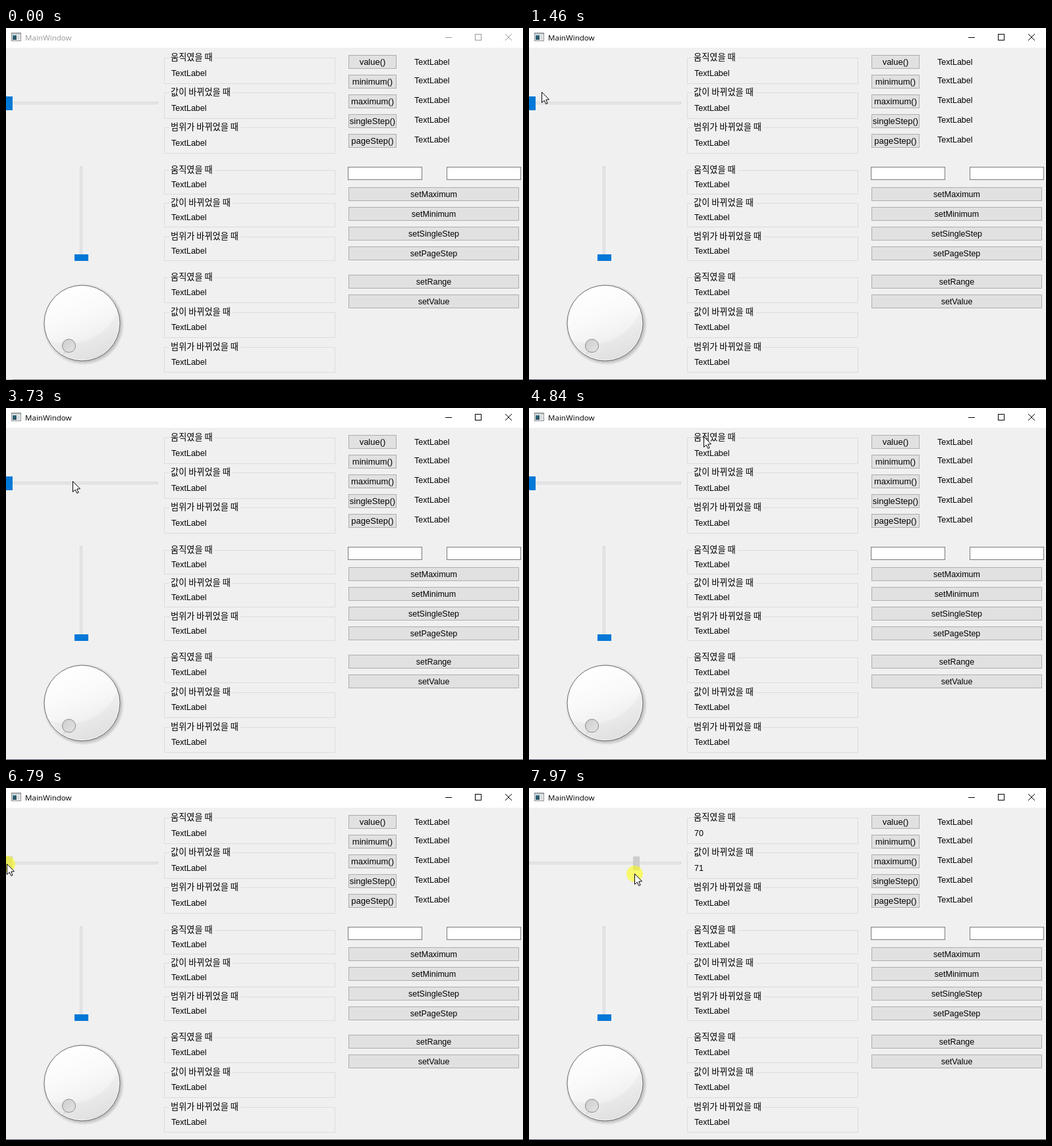
An HTML page with a canvas for the animation above (8 s loop, 785 by 535 pixels).

```html
<!DOCTYPE html>
<html lang="ko">
<head>
<meta charset="utf-8">
<title>MainWindow</title>
<style>
html, body { margin: 0; width: 100%; height: 100%; overflow: hidden; background: #f0f0f0; }
canvas { display: block; }
</style>
</head>
<body>
<canvas id="stage" width="785" height="535"></canvas>
<script>
const ctx = document.getElementById('stage').getContext('2d');
const LOOP = 8000, ACTIVATE = 200, PRESS = 6790, TICK = 70;
const LATIN = '12.5px "Liberation Sans", Arial, sans-serif';
const CALLS = '13px "Liberation Sans", Arial, sans-serif';
const HANGUL = '13.2px "Noto Sans CJK KR", "Noto Sans CJK", sans-serif';
const TITLE = '11.6px "Open Sans", "Noto Sans", sans-serif';

// Pointer strokes: start, end, then [tick, x, y] waypoints.
const STROKES = [
  [200, 550, [0, 470, 540], [5, 396, 118]],
  [690, 1460, [0, 390, 108], [3, 280, 62], [11, 19, 97]],
  [1530, 2300, [0, 18, 98], [3, 60, 108], [11, 264, 45]],
  [2430, 2830, [0, 264, 40], [2, 262, 53], [6, 256, 108]],
  [2980, 3730, [0, 262, 112], [4, 190, 154], [8, 59, 120], [11, 101, 111]],
  [3800, 4560, [0, 95, 113], [2, 83, 122], [11, 275, 85]],
  [4630, 5400, [0, 272, 78], [3, 265, 43], [9, 309, 55], [11, 302, 30]],
  [5470, 6240, [0, 296, 32], [9, 20, 127], [11, 5, 112]],
  [6310, 6520, [0, 5, 109], [3, 1, 115]],
  [6790, 7550, [0, 1, 115], [11, 113, 128]],
  [7620, 7970, [0, 118, 129], [5, 160, 130]]
];

const GROUP_TOPS = [45, 98, 151, 216, 266, 317, 379, 432, 485];
const GROUP_DROPS = [39, 36, 38];
const HEADINGS = ['움직였을 때', '값이 바뀌었을 때', '범위가 바뀌었을 때'];
const GETTERS = ['value()', 'minimum()', 'maximum()', 'singleStep()', 'pageStep()'];
const SETTERS = ['setMaximum', 'setMinimum', 'setSingleStep', 'setPageStep', 'setRange', 'setValue'];

function pointerAt(t) {
  const stroke = STROKES.filter(s => s[0] <= t).pop();
  if (!stroke) return { x: 470, y: 540 };
  const [start, end, ...points] = stroke;
  const ticks = Math.round((end - start) / TICK);
  const tick = Math.min(ticks, Math.floor((t - start) / (end - start) * ticks + 0.06));
  const next = Math.max(1, points.findIndex(p => p[0] >= tick));
  const a = points[next - 1], b = points[next];
  const k = (tick - a[0]) / (b[0] - a[0]);
  return { x: Math.round(a[1] + (b[1] - a[1]) * k), y: Math.round(a[2] + (b[2] - a[2]) * k) };
}

function fill(x, y, w, h, color) {
  ctx.fillStyle = color;
  ctx.fillRect(x, y, w, h);
}

function box(x, y, w, h, color, edge) {
  if (color) fill(x, y, w, h, color);
  ctx.strokeStyle = edge;
  ctx.lineWidth = 1;
  ctx.strokeRect(x + 0.5, y + 0.5, w - 1, h - 1);
}

function text(str, x, y, font = LATIN, color = '#000', align = 'left') {
  ctx.font = font;
  ctx.fillStyle = color;
  ctx.textAlign = align;
  ctx.fillText(str, x, y);
}

function disc(x, y, r, color, edge) {
  ctx.beginPath();
  ctx.arc(x, y, r, 0, Math.PI * 2);
  if (color) {
    ctx.fillStyle = color;
    ctx.fill();
  }
  if (edge) {
    ctx.strokeStyle = edge;
    ctx.lineWidth = 1;
    ctx.stroke();
  }
}

function line(color, x0, y0, x1, y1) {
  ctx.strokeStyle = color;
  ctx.lineWidth = 1;
  ctx.beginPath();
  ctx.moveTo(x0, y0);
  ctx.lineTo(x1, y1);
  ctx.stroke();
}

function ramp(x0, y0, x1, y1, ...colors) {
  const g = ctx.createLinearGradient(x0, y0, x1, y1);
  colors.forEach((c, i) => g.addColorStop(i / (colors.length - 1), c));
  return g;
}

function titleBar(active) {
  const ink = active ? '#000' : '#999';
  fill(0, 0, 785, 30, '#fff');
  box(8, 7, 15, 13, '#f4f4f4', '#8c8c8c');
  fill(9, 8, 13, 2, '#b9c0c4');
  fill(10, 11, 6, 7, ramp(10, 11, 16, 18, '#2f6f86', '#2d4a58'));
  fill(17, 11, 4, 7, '#d5dadd');
  text('MainWindow', 29, 19, TITLE, ink);
  line(ink, 667, 14.5, 677, 14.5);
  box(712, 9, 10, 10, null, ink);
  line(ink, 758, 9, 768, 19);
  line(ink, 768, 9, 758, 19);
}

function groups(moved, changed) {
  GROUP_TOPS.forEach((top, i) => {
    const heading = HEADINGS[i % 3];
    const drop = GROUP_DROPS[Math.floor(i / 3)];
    box(240, top, 260, drop + 1, null, '#dcdcdc');
    ctx.font = HANGUL;
    fill(248, top, ctx.measureText(heading).width + 5, 1, '#f0f0f0');
    text(heading, 250, top + 4, HANGUL);
    const label = changed && i < 2 ? String(i ? changed : moved) : 'TextLabel';
    text(label, 251, top + Math.round(drop * 0.59) + 5);
  });
}

function buttons() {
  GETTERS.forEach((name, i) => {
    const y = 41 + i * 30;
    box(520, y, 73, 21, '#e1e1e1', '#adadad');
    text(name, 556.5, y + 15, CALLS, '#000', 'center');
    text('TextLabel', 620, i ? y + 13 : y + 15);
  });
  box(519, 211, 113, 20, '#fff', '#7a7a7a');
  box(669, 211, 113, 20, '#fff', '#7a7a7a');
  SETTERS.forEach((name, i) => {
    const y = 242 + i * 30 + (i > 3 ? 13 : 0);
    box(520, y, 259, 21, '#e1e1e1', '#adadad');
    text(name, 649.5, y + 15, LATIN, '#000', 'center');
  });
}

function sliders(x, color) {
  box(0, 112, 231, 4, '#e7eaea', '#d6d6d6');
  fill(x, 104, 10, 21, color);
  box(112, 210, 4, 144, '#e7eaea', '#d6d6d6');
  fill(104, 344, 21, 10, '#0078d7');
}

function dial() {
  const cx = 115.5, cy = 448.5;
  const shadow = ctx.createRadialGradient(cx + 2, cy + 2, 54, cx + 2, cy + 2, 62);
  shadow.addColorStop(0, 'rgba(0,0,0,.28)');
  shadow.addColorStop(1, 'rgba(0,0,0,0)');
  disc(cx + 2, cy + 2, 62, shadow);
  disc(cx, cy, 57.5, ramp(95, 391, 140, 506, '#fdfdfd', '#f1f1f1', '#dedede'));
  ctx.save();
  ctx.clip();
  disc(95, 400, 80, ramp(95, 391, 130, 480, 'rgba(255,255,255,.8)', 'rgba(255,255,255,.25)'));
  ctx.restore();
  disc(cx, cy, 56.5, null, 'rgba(255,255,255,.8)');
  disc(cx, cy, 57.5, null, '#6c6c6c');
  line('#c4c4c4', 87, 496, 90, 492);
  disc(95.5, 483, 10, ramp(88, 475, 103, 491, '#cfcfcf', '#e2e2e2'), '#8a8a8a');
}

function bottomEdge(active) {
  fill(0, 534, 785, 1, active ? '#4a4850' : '#777');
  if (active) fill(0, 534, 85, 1, '#5c4f68');
  else fill(0, 534, 10, 1, '#b4b4b4');
}

const ARROW = new Path2D('M0 0V16L3.7 12.6L6.3 18L8.6 17L6.2 11.6L11 11.3Z');

function pointer({ x, y }) {
  ctx.save();
  ctx.translate(x + 0.5, y + 0.5);
  ctx.fillStyle = '#fff';
  ctx.fill(ARROW);
  ctx.strokeStyle = '#000';
  ctx.lineWidth = 1;
  ctx.stroke(ARROW);
  ctx.restore();
}

function draw(t) {
  const active = t >= ACTIVATE, pressed = t >= PRESS;
  const tip = pointerAt(t);
  const handle = pressed ? Math.max(0, tip.x - 2) : 0;
  const value = handle / 221 * 99;
  const hover = tip.x < 10 && tip.y >= 104 && tip.y < 125;

  fill(0, 0, 785, 535, '#f0f0f0');
  titleBar(active);
  sliders(handle, pressed ? '#ccc' : hover ? '#171717' : '#0078d7');
  dial();
  groups(Math.floor(value), Math.round(value));
  buttons();
  bottomEdge(active);
  if (pressed) disc(tip.x + 0.5, tip.y + 0.5, 12.5, 'rgba(255,255,0,.55)');
  pointer(tip);
}

const began = performance.now();
function tick() {
  draw((performance.now() - began) % LOOP);
  requestAnimationFrame(tick);
}
tick();
</script>
</body>
</html>
```
